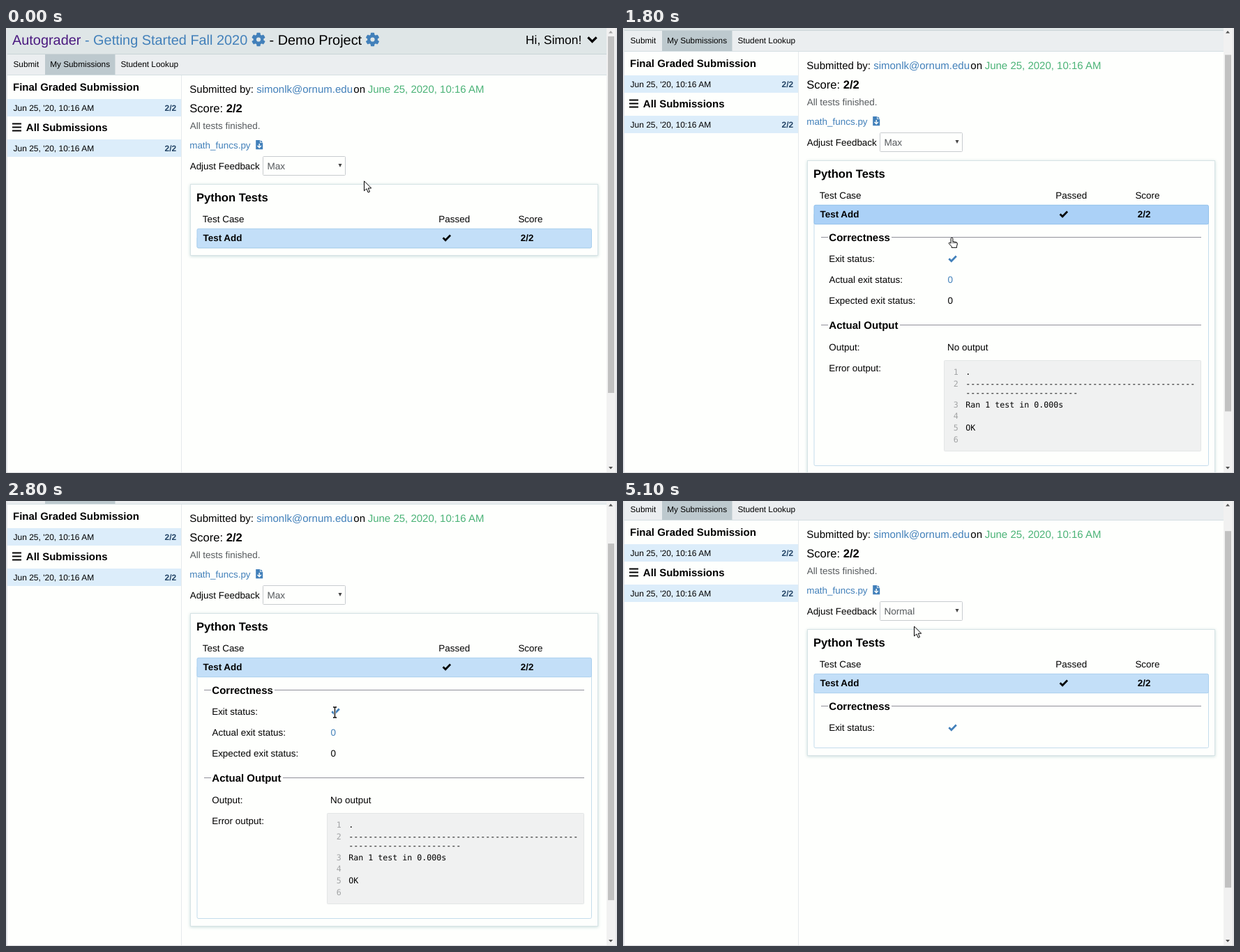
Recreate the animation shown at these times as an HTML page. Size 876 by 639 pixels, loop 7500 ms.

```html
<!DOCTYPE html>
<html lang="en">
<head>
<meta charset="utf-8">
<title>Submission results</title>
<style>
html, body { margin: 0; width: 100%; height: 100%; overflow: hidden; background: #fefffd; }
svg { display: block; }
text { font-family: "Liberation Sans", Arial, sans-serif; text-rendering: geometricPrecision; white-space: pre; }
.mono { font-family: "DejaVu Sans Mono", monospace; }
#card { filter: drop-shadow(0 1px 2px #c8dcdc); }
#list { filter: drop-shadow(0 2px 2px #0004); }
</style>
</head>
<body>
<svg id="stage" width="876" height="639" viewBox="0 0 876 639"></svg>
<script>
const BLUE = '#4280ba', GREY = '#55595c', NAVY = '#234466', PAGE = '#fefffd';
const SMALL = 11.8, BASE = 13.45, MID = 15, BIG = 16.6;
const LOOP = 7500, STEP = 100;

const text = (x, y, size, str, fill = '#000', attrs = '') =>
  `<text x="${x}" y="${y}" font-size="${size}" fill="${fill}" ${attrs}>${str}</text>`;
const bold = (x, y, size, str, fill) => text(x, y, size, str, fill, 'font-weight="bold"');
const rect = (x, y, w, h, fill, attrs = '') =>
  `<rect x="${x}" y="${y}" width="${w}" height="${h}" fill="${fill}" ${attrs}/>`;
const line = (d, color, width, attrs = '') =>
  `<path d="${d}" fill="none" stroke="${color}" stroke-width="${width}" ${attrs}/>`;
const check = (x, y, color) =>
  line(`M${x - 5.2} ${y + .3}l3.5 3.5 7-7.3`, color, 2.7);

function gear(x, y) {
  const teeth = [0, 60, 120].map(a =>
    rect(-2.7, -9.7, 5.4, 19.4, BLUE, `rx="1" transform="rotate(${a})"`)).join('');
  return `<g transform="translate(${x} ${y})">${teeth}<circle r="7.4" fill="${BLUE}"/><circle r="3.1" fill="#dfe6e7"/></g>`;
}

const submission = y =>
  rect(2, y, 249, 25, '#dcedfa') +
  text(10.5, y + 17, 12, "Jun 25, '20, 10:16 AM") +
  bold(227.6, y + 17, 12, '2/2', NAVY);

const legend = (y, label, end) =>
  line(`M284 ${y}.5h10M${end} ${y}.5H829`, '#90909a', 1) + bold(295.3, y + 5.5, MID, label);

const header =
  rect(0, 0, 876, 37, '#dfe6e7') + rect(0, 37, 876, 1, '#cad4d7') +
  text(9, 24, 19.9, `<tspan fill="#4b1a80">Autograder</tspan> - Getting Started Fall 2020`, BLUE) +
  gear(362, 16.5) + text(377.5, 24, 19.9, '- Demo Project') + gear(525.5, 16.5) +
  text(745, 23, 17.4, 'Hi, Simon!') +
  line('M834.4 13.4l6.1 6 6.1-6', '#000', 3.2) +
  rect(0, 38, 876, 29.5, '#ebeef0') + rect(56, 38, 100.5, 29.5, '#bdc9ce') +
  rect(0, 67, 876, 1, '#d4dfe2') +
  text(10.5, 56, SMALL, 'Submit') + text(63.2, 56, SMALL, 'My Submissions') +
  text(164.4, 56, SMALL, 'Student Lookup');

const sidebar =
  rect(251, 68, 1, 800, '#e5eaec') +
  bold(10, 90, MID, 'Final Graded Submission') + submission(102) +
  line('M9 137.5h13M9 142.5h13M9 147.5h13', '#000', 2) +
  bold(28.8, 148, MID, 'All Submissions') + submission(160);

const summary =
  text(263.3, 93, MID, 'Submitted by:') + text(359.2, 93, MID, 'simonlk@ornum.edu', BLUE) +
  text(498.3, 93, MID, 'on') + text(518.7, 93, MID, 'June 25, 2020, 10:16 AM', '#4bb377') +
  text(263.2, 120.5, BIG, 'Score: <tspan font-weight="bold">2/2</tspan>') +
  text(263.7, 144.5, BASE, 'All tests finished.', GREY) +
  text(263.2, 172.5, BASE, 'math_funcs.py', BLUE) +
  `<path d="M358.2 161h6v4h4v9.3h-10zM365 161l3.2 3.2H365z" fill="${BLUE}"/>` +
  line('M363.2 166v5.5m-2.7-2.4l2.7 2.7 2.7-2.7', PAGE, 1.4) +
  text(263.7, 202.5, BASE, 'Adjust Feedback') +
  rect(368.5, 184.5, 118, 27, PAGE, 'id="select" rx="1"') +
  text(374.4, 202.7, 13.6, '', GREY, 'id="choice"') +
  '<path d="M476.5 195h5l-2.5 5z" fill="#444"/>';

const card =
  rect(264.5, 224.5, 584, 102, PAGE, 'id="card" stroke="#d6e3e5"') +
  bold(272.9, 249, BIG, 'Python Tests') +
  text(281.8, 278.5, BASE, 'Test Case') + text(620.3, 278.5, BASE, 'Passed') +
  text(734.4, 278.5, BASE, 'Score') +
  rect(274, 300, 565.5, 0, 'none', 'id="panel" rx="2" stroke="#c4dcec"') +
  rect(274, 288.3, 565.5, 27.4, '', 'id="row" rx="2"') +
  bold(282.5, 306, BASE, 'Test Add') + check(631.8, 301, '#000') +
  bold(737.7, 306, BASE, '2/2');

const brief = legend(334, 'Correctness', 385) +
  text(295.2, 369.8, BASE, 'Exit status:') + check(472.5, 365, BLUE);

const code = ['.', '-'.repeat(47), 'Ran 1 test in 0.000s', '', 'OK', '']
  .map((str, i) => {
    const y = 532 + 16.6 * i + (i > 1 ? 13.5 : 0);
    return text(473.8, y, 11.63, i + 1, '#a2a4a5', 'class="mono"') +
      text(491.3, y, 11.63, str, '#000', 'class="mono"');
  }).join('');

const full =
  text(295.6, 399.8, BASE, 'Actual exit status:') + text(465.4, 399.8, BASE, '0', BLUE) +
  text(295.2, 429.8, BASE, 'Expected exit status:') + text(465.4, 429.8, BASE, '0') +
  legend(460, 'Actual Output', 397) +
  text(295.3, 496.8, BASE, 'Output:') + text(465.1, 496.8, BASE, 'No output') +
  text(295.2, 526.8, BASE, 'Error output:') +
  rect(460.5, 511.5, 368, 130, '#f0f1f1', 'stroke="#e3e6e6" rx="1"') + code +
  text(491.3, 562, 11.63, '-'.repeat(23), '#000', 'class="mono"');

const options = ['Normal', 'Past Limit', 'Final Graded', 'Student Lookup', 'Max'];
const list = rect(368.5, 211.5, 117.5, 85.5, PAGE, 'stroke="#88a8cc"') +
  rect(369, 0, 116.7, 16.8, '#318ff0', 'id="mark"') +
  options.map((str, i) => text(375, 224.6 + 16.8 * i, BASE, str, GREY, 'class="option"')).join('');

const frame =
  rect(0, 0, 2, 639, '#e1e3e7') + rect(861, 0, 13, 639, '#f1f1f1') +
  rect(863, 12, 9, 512, '#c1c1c1', 'id="thumb"') +
  '<path id="up" d="M864 7.5h6l-3-3.5z"/><path d="M864 630h6l-3 3.5z" fill="#505050"/>' +
  rect(874, 0, 2, 639, '#e4e5e8') + rect(0, 638, 876, 1, '#d9dadc');

const ibeam = 'M-2.5-5.5h1.7l.8.7.8-.7h1.7M0-5V9M-2.5 9.5h1.7l.8-.7.8.7h1.7';
const cursors = {
  arrow: '<path d="M0 0v14l3.4-3 2.3 5.3 2.3-1-2.3-5.1h4.5z" fill="#fff" stroke="#000"/>',
  hand: '<path d="M-1.4 1a1.4 1.4 0 0 1 2.8 0v4.2l5 1q1.7.5 1.5 2.2l-.9 3.6v1.8h-7.4v-1.6l-3.7-4q-.6-1.6 1-1.6l1.7 1.1z" fill="#fff" stroke="#000"/>' +
    line('M1.5 5v3m2.2-2.5v2.5m2.1-2v2', '#000', .7),
  beam: line(ibeam, '#fff', 3) + line(ibeam, '#000', 1.3)
};

stage.innerHTML =
  `<rect width="876" height="639" fill="${PAGE}"/>` +
  `<g id="page">${header}${sidebar}${summary}${card}<g id="brief">${brief}</g><g id="full">${full}</g><g id="list">${list}</g></g>` +
  frame +
  `<g id="cursor">${Object.entries(cursors).map(([k, v]) => `<g id="${k}">${v}</g>`).join('')}</g>`;

const $ = id => document.getElementById(id);
const set = (id, attrs) => { for (const k in attrs) $(id).setAttribute(k, attrs[k]); };
const show = (id, on) => set(id, { display: on ? 'inline' : 'none' });
const smooth = u => u * u * (3 - 2 * u);

// Keys are [time, ...values]
function at(keys, t, ease = u => u) {
  const i = keys.findIndex(k => k[0] > t);
  if (i < 0) return keys[keys.length - 1].slice(1);
  if (i === 0) return keys[0].slice(1);
  const [a, b] = [keys[i - 1], keys[i]];
  const u = ease((t - a[0]) / (b[0] - a[0]));
  return a.slice(1).map((v, j) => v + (b[j + 1] - v) * u);
}

const scrollKeys = [[1700, 0], [1800, 34], [1900, 48], [2000, 67], [2100, 88], [2200, 115], [2300, 129],
  [2500, 129], [2600, 115], [2700, 86], [2800, 63], [2900, 46], [3000, 40]];
const cursorKeys = [[300, 513.5, 219.8], [800, 471.5, 297], [900, 471.5, 297], [1000, 471.5, 301.5],
  [3100, 471.5, 301.5], [3700, 424.5, 156.8], [4200, 424.5, 156.8], [4800, 417.5, 180]];

function draw(now) {
  const t = Math.floor(now % LOOP / STEP) * STEP;
  const [scroll] = at(scrollKeys, t);
  const [x, y] = at(cursorKeys, t, smooth);

  // Hover is only re-evaluated once the first scroll has settled
  const rowTop = 288 - (t < 2300 ? 0 : scroll);
  const over = y > rowTop && y < rowTop + 28;
  const open = t >= 1100, changed = t >= 5100, dropped = t >= 4000 && !changed;
  const bottom = !open ? 316 : changed ? 394.5 : 662.5;

  set('page', { transform: `translate(0 ${-scroll})` });
  set('thumb', { y: 12 + scroll * .78 });
  set('up', { fill: scroll ? '#505050' : '#a3a3a3' });
  set('card', { height: bottom - (open ? 213.5 : 214) });
  set('panel', { height: bottom - 300 });
  set('row', over ? { fill: '#abd1f7', stroke: '#92c1ea' } : { fill: '#c3dff8', stroke: '#a9cfee' });
  show('brief', open);
  show('full', open && !changed);

  show('list', dropped);
  set('select', { stroke: dropped ? '#7fa3cb' : '#c8cccf' });
  $('choice').textContent = changed ? 'Normal' : 'Max';
  const picked = y > 172 ? 0 : 4;
  set('mark', { y: 212.3 + 16.8 * picked });
  document.querySelectorAll('.option').forEach((o, i) =>
    o.setAttribute('fill', i === picked ? '#fff' : GREY));

  const kind = over ? 'hand' : t >= 2300 && t < 3000 ? 'beam' : 'arrow';
  for (const k in cursors) show(k, k === kind);
  set('cursor', { transform: `translate(${x} ${y})` });
}

const start = performance.now();
function tick() {
  draw(performance.now() - start);
  requestAnimationFrame(tick);
}
tick();
</script>
</body>
</html>
```
